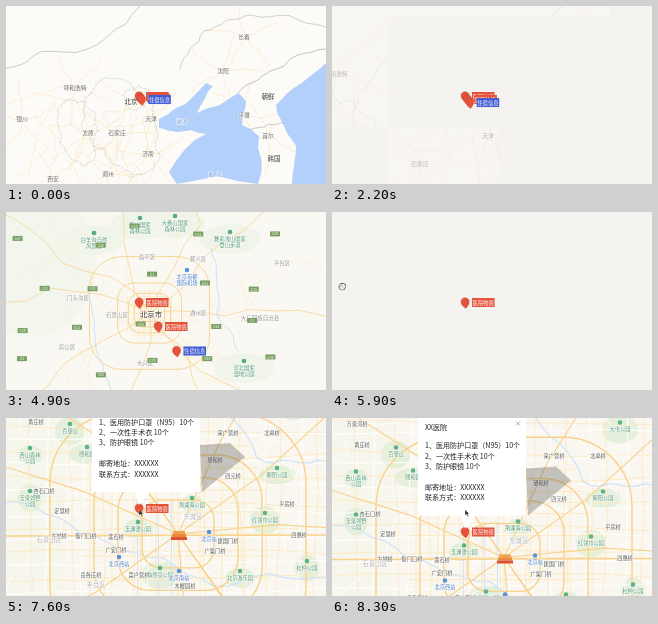
These frames come from a looping animation (320x178 px, 8.4 s). An HTML page with a canvas:

```html
<!DOCTYPE html>
<html lang="zh">
<head>
<meta charset="utf-8">
<title>地图缩放</title>
<style>
html, body { margin: 0; width: 100%; height: 100%; overflow: hidden; background: #f5f3f0; }
canvas { display: block; width: 320px; height: 178px; }
</style>
</head>
<body>
<canvas id="map"></canvas>
<script>
const W = 320, H = 178, LOOP = 8400, TILE = 111;
const FONT = '"Noto Sans CJK SC", "Noto Sans CJK", "Noto Sans", sans-serif';
const BLANK = '#f5f3f0', RED = '#e5513a', BLUE = '#3f5bd6';
const ROAD = '#f8d28a', LANE = '#fcebc6', EDGE = '#b4b4b0', GREEN = '#4c9471', STATION = '#4b7fc7';
const tip = { x: 134, y: 96 }, center = { x: 143.5, y: 101 };
const cv = document.getElementById('map'), c = cv.getContext('2d');
const dpr = window.devicePixelRatio || 1;
cv.width = W * dpr;
cv.height = H * dpr;

// Geometry grows around the pin tip by zoom; text and line widths keep their size.
let zoom = 1;
const X = x => tip.x + (x - tip.x) * zoom;
const Y = y => tip.y + (y - tip.y) * zoom;
const clamp = v => Math.max(0, Math.min(1, v));
const ease = v => (v = clamp(v), v * v * (3 - 2 * v));

function rng(seed) {
  return () => (seed = (seed * 16807) % 2147483647) / 2147483647;
}

// Turns a few key points into a natural line by shifting midpoints sideways.
function rough(p, seed, amp = .12, depth = 3) {
  const r = rng(seed * 7919);
  while (depth--) {
    const q = [];
    for (let i = 0; i < p.length - 1; i++) {
      const [x, y] = p[i], [u, v] = p[i + 1], d = (r() - .5) * 2 * amp;
      q.push(p[i], [(x + u) / 2 - (v - y) * d, (y + v) / 2 + (u - x) * d]);
    }
    q.push(p[p.length - 1]);
    p = q;
  }
  return p;
}
function trace(p) {
  c.beginPath();
  for (const [x, y] of p) c.lineTo(X(x), Y(y));
}
function area(p, fill) {
  trace(p);
  c.fillStyle = fill;
  c.fill();
}
function line(p, color, width, dash = []) {
  trace(p);
  c.setLineDash(dash);
  c.lineJoin = 'round';
  c.strokeStyle = color;
  c.lineWidth = width;
  c.stroke();
  c.setLineDash([]);
}
function fillBox(x, y, w, h, color) {
  c.fillStyle = color;
  c.fillRect(x, y, w, h);
}
function blob(x, y, rx, ry, color) {
  c.beginPath();
  c.ellipse(X(x), Y(y), rx, ry, 0, 0, 7);
  c.fillStyle = color;
  c.fill();
}
function text(s, x, y, size, color, align = 'left', weight = 400) {
  c.font = `${weight} ${size}px ${FONT}`;
  c.textAlign = align;
  c.textBaseline = 'middle';
  c.fillStyle = color;
  c.fillText(s, x, y);
}

// "name,x,y;name,x,y", with a slash where a name wraps
const places = list => list.split(';').map(s => s.split(',')).map(([s, x, y]) => [s, +x, +y]);
function labels(list, size, color, dot) {
  for (const [s, x, y] of list) {
    if (dot) blob(x, y - 7, 2.3, 2.3, dot);
    s.split('/').forEach((part, i) => {
      const v = Y(y) + i * size * 1.1;
      c.font = `400 ${size}px ${FONT}`;
      c.textAlign = 'center';
      c.textBaseline = 'middle';
      c.lineJoin = 'round';
      c.lineWidth = 1.2;
      c.strokeStyle = 'rgba(255,255,255,.8)';
      c.strokeText(part, X(x), v);
      text(part, X(x), v, size, color, 'center');
    });
  }
}

// Road signs on a loosely shaken grid
function signs(seed, cols, rows, w, h) {
  const r = rng(seed);
  for (let n = 0; n < cols * rows; n++) {
    const x = (n % cols + .2 + r() * .6) * w / cols, y = (Math.floor(n / cols) + .2 + r() * .6) * h / rows;
    fillBox(x - 5, y - 2.5, 10, 5, '#78a062');
    text('G' + Math.ceil(r() * 95), x, y + .2, 3.6, '#fff', 'center');
  }
}
function star(x, y, n, len, seed, color, width) {
  for (let i = 0; i < n; i++) {
    const a = (i + seed % 3 / 3) * 2 * Math.PI / n;
    line(rough([[x, y], [x + len * Math.cos(a), y + len * Math.sin(a)]], seed + i * 5 + 1, .13), color, width);
  }
}
function wander(seed, n, x, y, w, h, step, color, width) {
  const r = rng(seed);
  for (let i = 0; i < n; i++) {
    let px = x + r() * w, py = y + r() * h, a = r() * 6.3;
    const p = [[px, py]];
    for (let j = 0; j < 7; j++) {
      a += r() - .5;
      p.push([px += Math.cos(a) * step, py += Math.sin(a) * step]);
    }
    line(p, color, width);
  }
}
function outline(x, y, rx, ry, seed, width) {
  const r = rng(seed), p = [];
  for (let i = 0; i < 9; i++) {
    const a = i * Math.PI * 2 / 9, k = .8 + r() * .4;
    p.push([x + rx * k * Math.cos(a), y + ry * k * Math.sin(a)]);
  }
  line(rough([...p, p[0]], seed, .2), EDGE, width, [3, 1]);
}

const towns = places('长春,238,31;沈阳,217,65;呼和浩特,69,82;太原,82,127;石家庄,111,127;天津,145,113;济南,142,148;郑州,102,168;西安,47,173;银川,16,113;平壤,238,109;首尔,262,130');
function region() {
  fillBox(0, 0, W, H, '#fdfbf7');
  towns.forEach(([, x, y], i) => star(x, y, 5, 38, i + 2, '#fae5bd', .6));
  wander(11, 30, 30, 85, 130, 93, 7, '#fae8c6', .6);
  line(rough([[0, 62], [58, 46], [134, 0]], 3), EDGE, .7);
  line(rough([[174, 63], [198, 25], [245, 9], [320, 21]], 5), EDGE, .6);
  line(rough([[232, 87], [264, 65], [320, 43]], 8), EDGE, .8);
  line(rough([[244, 124], [282, 117]], 4), EDGE, .7);
  outline(75, 125, 22, 37, 31, .5);
  outline(130, 92, 14, 11, 47, .5);
  outline(120, 120, 38, 50, 59, .5);
  const sea = '#b3d0fb';
  area(rough([[153, 113], [170, 102], [200, 77], [207, 80], [191, 107], [232, 87], [240, 95], [236, 119], [253, 130],
    [252, 178], [171, 178], [163, 166], [200, 128], [170, 126], [153, 122]], 12, .1, 2), sea);
  area(rough([[320, 57], [270, 99], [272, 109], [290, 140], [286, 178], [320, 178]], 9, .06), sea);
  labels(towns, 5.8, '#666');
  labels(places('北京,125,96;朝鲜,262,91;韩国,268,153'), 6.4, '#333');
  labels(places('渤 海,176,115;黄   海,209,168'), 5, '#6f94c8');
}

const counties = places('张家口,65,44;承德,209,29;秦皇岛,286,90;唐山,220,111;廊坊,149,119;保定,93,155');
function province() {
  fillBox(0, 0, W, H, '#fefdfb');
  counties.forEach(([, x, y], i) => star(x, y, 5, 60, i + 3, LANE, .7));
  wander(17, 35, 0, 0, 300, 178, 11, '#fcf1dc', .6);
  star(tip.x, tip.y, 9, 190, 7, ROAD, .8);
  star(174, 153, 6, 80, 4, ROAD, .7);
  outline(132, 86, 42, 27, 83, .8);
  for (let i = 0; i < 6; i++) outline(30 + i % 3 * 105, 35 + Math.floor(i / 3) * 100, 55, 45, 101 + i * 17, .5);
  area(rough([[320, 74], [282, 102], [253, 122], [262, 146], [222, 150], [206, 159], [207, 178], [320, 178]], 6, .07), '#cfe3fb');
  labels(counties, 6, '#888');
  labels(places('北京市,129,97;天津,174,156'), 6.4, '#333');
  signs(19, 7, 5, 285, 165);
}

// Ring roads, radial roads and the inner street grid, shared by both city levels
function roads(width) {
  for (let i = -4; i <= 4; i++) {
    const d = i * 5.5, half = 26 - Math.abs(i) * 2;
    line([[center.x - half, center.y + d], [center.x + half, center.y + d]], LANE, width * .8);
    line([[center.x + d, center.y - half], [center.x + d, center.y + half]], LANE, width * .8);
  }
  star(center.x, center.y, 10, 200, 6, ROAD, width * .8);
  for (const r of [9, 15, 21, 32, 60]) {
    const w = r * 2 * zoom, h = w * .94;
    c.beginPath();
    c.roundRect(X(center.x) - w / 2, Y(center.y) - h / 2, w, h, w * .27);
    c.strokeStyle = ROAD;
    c.lineWidth = width;
    c.stroke();
  }
}

const hills = places('狼山国家/森林公园,134,13;大杨山国家/森林公园,169,11;白羊沟自然/风景区,88,28;舞彩浅山国家/登山步道,224,27;河北国家/湿地公园,238,156');
function city() {
  fillBox(0, 0, W, H, '#faf8f3');
  blob(25, 50, 65, 75, '#f3f6ec');
  for (const [, x, y] of hills) blob(x, y, 30, 15, '#f1f5e9');
  wander(61, 45, 50, 20, 220, 150, 10, '#fcefd3', .6);
  roads(.9);
  line(rough([[205, 36], [211, 101], [233, 140]], 5), '#c9def8', .9);
  line(rough([[83, 81], [89, 123], [105, 178]], 7), '#c9def8', .9);
  labels(hills, 5.3, GREEN, '#54aa7f');
  labels(places('北京首都/国际机场,181,65'), 5.3, STATION, '#5b91df');
  labels(places('昌平区,141,45;顺义区,192,47;门头沟区,72,86;石景山区,111,103;通州区,192,101;大兴区,139,151;房山区,61,135;平谷区,276,51;大厂回族自治县,254,106'), 5.5, '#999');
  labels(places('北京市,145,102'), 7.4, '#333');
  signs(43, 5, 4, 290, 178);
}

const parks = places('西山森林/公园,24,37;百望山,64,13;颐和园,81,36;玉泉郊野/公园,24,80;玉渊潭公园,132,111;陶然亭公园,154,157;荆湖海公园,186,87;红领巾公园,259,102;朝阳公园,271,57;杜仲公园,301,150;北京游乐园,234,160;大屯公园,288,-12');
const bridges = places('黄庄桥,30,4;万泉河桥,25,-17;杏石口桥,38,73;定慧桥,56,93;古城桥,53,118;衙门口桥,80,118;莲石桥,110,119;广安门桥,110,132;岳各庄桥,85,157;菜户营桥,133,157;木樨园桥,179,168;广渠门桥,209,133;建国门桥,222,123;望和桥,209,42;四元桥,227,58;来广营桥,222,15;北皋桥,266,15;平房桥,281,86;四惠桥,293,117');
function streets() {
  fillBox(0, -40, W, H + 60, '#faf7f1');
  fillBox(0, -40, 60, H + 60, '#f7f6ed');
  parks.forEach(([, x, y], i) => blob(x, y, 12 + i % 3 * 3, 10 + i % 2 * 4, '#e5f0dc'));
  const r = rng(77);
  for (let i = 0; i < 18; i++) {
    const x = i * 18 + r() * 8, y = i * 13 - 35 + r() * 6, lean = (r() - .5) * 14;
    line(rough([[x, -40], [x + lean, 190]], i + 3, .02), i % 2 ? LANE : '#fff', 1);
    line(rough([[0, y], [W, y + lean]], i + 9, .02), i % 2 ? LANE : '#fff', 1);
  }
  wander(91, 30, 0, -20, 320, 200, 7, '#fff', 1);
  line(rough([[0, 84], [103, 125], [207, 168], [320, 160]], 5), '#cfe2f8', 1.2);
  line(rough([[195, -30], [251, 40], [320, 43]], 4), '#cfe2f8', 1.2);
  for (const x of [131, 152, 165]) line([[x, 80], [x + 1, 190]], '#cfe2f8', 1);
  zoom = 4;
  roads(1.4);
  zoom = 1;
  line([[0, 118], [W, 117]], ROAD, 1.6);
  labels(parks, 5.2, GREEN, '#5bb389');
  labels(places('北京站,203,121;北京南站,173,160;北京西站,113,146'), 5.2, STATION, '#5b93e0');
  labels(bridges, 5.2, '#555');
  labels(places('石景山区,43,122;东城区,187,99;丰台区,90,167'), 6.3, '#b5b5b5');
  // gate tower
  for (let i = 0; i < 3; i++) fillBox(167 - i, 113 + i * 3, 12 + i * 2, 3, ['#eda14e', '#eb883c', '#d95236'][i]);
}

// Tiles come in one by one: an unloaded tile is covered by the blank colour.
function cover(loaded) {
  for (let j = 0; j < 3; j++)
    for (let i = 0; i < 4; i++) {
      c.globalAlpha = 1 - clamp(loaded(i, j));
      fillBox(i * TILE - 55, j * TILE - 101, TILE, TILE, BLANK);
    }
  c.globalAlpha = 1;
}
const stagger = p => (i, j) => p * 1.7 - ((i * 5 + j * 3) % 7) / 10;
const firstTiles = (i, j) => i + j < 2 || (i === 2 && !j) || (i === 1 && j === 2) ? (i && j === 1 ? 0 : .45) : 0;

function grow(scene, k, shown) {
  c.save();
  c.translate(tip.x, tip.y);
  c.scale(k, k);
  c.translate(-tip.x, -tip.y);
  scene();
  c.restore();
  cover(() => shown);
}

function pin(dx, dy, s, color) {
  const x = tip.x + dx, y = tip.y + dy;
  c.beginPath();
  c.moveTo(x, y + .5);
  c.bezierCurveTo(x - 2, y - 1.5, x - 5.2, y - 3, x - 5, y - 6.6);
  c.bezierCurveTo(x - 4.6, y - 11.5, x + 2.8, y - 11.5, x + 3.2, y - 6.6);
  c.bezierCurveTo(x + 3.3, y - 3.5, x + 1.5, y - 2, x, y + .5);
  c.fillStyle = RED;
  c.fill();
  c.strokeStyle = '#c24a37';
  c.lineWidth = .4;
  c.stroke();
  fillBox(x + 6, y - 10, 22.5, 9, color);
  text(s, x + 17.2, y - 5.4, 5.3, '#fff', 'center', 500);
}
function pins(k) {
  pin(0, 0, '医院物资', RED);
  pin(19 * k, 24 * k, '医院物资', RED);
  pin(37.5 * k, 48.5 * k, '住宿信息', BLUE);
}

function info() {
  area([[194, 27], [224, 25], [239, 39], [196, 74]], 'rgba(70,70,70,.3)');
  fillBox(86, -26, 108, 100, '#fff');
  area([[128, 73], [145, 73], [133, 87]], '#fff');
  const rows = ['XX医院', '', '1、医用防护口罩（N95）10个', '2、一次性手术衣 10个', '3、防护眼镜 10个', '', '邮寄地址：XXXXXX', '联系方式：XXXXXX'];
  rows.forEach((s, i) => text(s, 93, i ? -17 + i * 10.45 : -14, 7.05, '#222'));
  line([[184, -20], [188, -16]], '#777', .6);
  line([[188, -20], [184, -16]], '#777', .6);
}

function hand(x, y) {
  c.lineCap = 'round';
  for (const [color, width] of [['#444', 2.4], ['#fff', 1.2]]) {
    for (let i = 0; i < 4; i++) {
      const fx = x - 1.8 + i * 1.4;
      line([[fx, y - 2.4 + Math.abs(i - 1.4) * .5], [x + (i - 1.5) * .8, y + 2.4]], color, width);
    }
    line([[x - 2.8, y + .6], [x - .8, y + 2.6]], color, width);
  }
  c.lineCap = 'butt';
}
function arrow(x, y) {
  const p = [[x, y], [x, y + 6], [x + 1.4, y + 4.8], [x + 2.5, y + 7], [x + 3.5, y + 6.5], [x + 2.5, y + 4.5], [x + 4.3, y + 4.4], [x, y]];
  area(p, '#222');
  line(p, '#fff', .4);
}

function draw(t) {
  c.setTransform(dpr, 0, 0, dpr, 0, 0);
  fillBox(0, 0, W, H, BLANK);
  let k = 1 / 16;
  if (t < 1900) region();
  else if (t < 2200) {
    const p = (t - 1800) / 400;
    k *= 2 ** p;
    grow(region, 2 ** p, 1 - p);
  } else if (t < 2800) {
    k = 1 / 8;
    zoom = 2;
    region();
    zoom = 1;
    cover(firstTiles);
  } else if (t < 3700) {
    k = 1 / 4;
    province();
    cover(stagger((t - 2700) / 500));
  } else if (t < 4000) {
    const p = (t - 3600) / 400;
    k = 4 ** (p - 1);
    grow(province, 4 ** p, 1 - p);
  } else if (t < 5000) {
    k = 1;
    city();
    cover(stagger((t - 3900) / 700));
  } else if (t < 5800) {
    const p = (t - 4900) / 800;
    k = 4 ** p;
    grow(city, k, 1 - p);
  } else {
    k = 4;
    c.translate(0, 23.5 * ease((t - 7600) / 600));
    if (t >= 6000) {
      streets();
      if (t < 6700) cover(stagger((t - 5900) / 700));
    }
  }
  pins(k);
  if (t >= 7500) info();
  c.setTransform(dpr, 0, 0, dpr, 0, 0);
  if (t >= 7200) arrow(133, 91.5);
  else if (t >= 5800) {
    const p = ease((t - 6400) / 800);
    hand(10.5 + 123 * p, 74.5 + 18 * p);
  }
}

function tick(now) {
  draw(Math.floor(now % LOOP / 100) * 100);
  requestAnimationFrame(tick);
}
draw(0);
requestAnimationFrame(tick);
</script>
</body>
</html>
```
